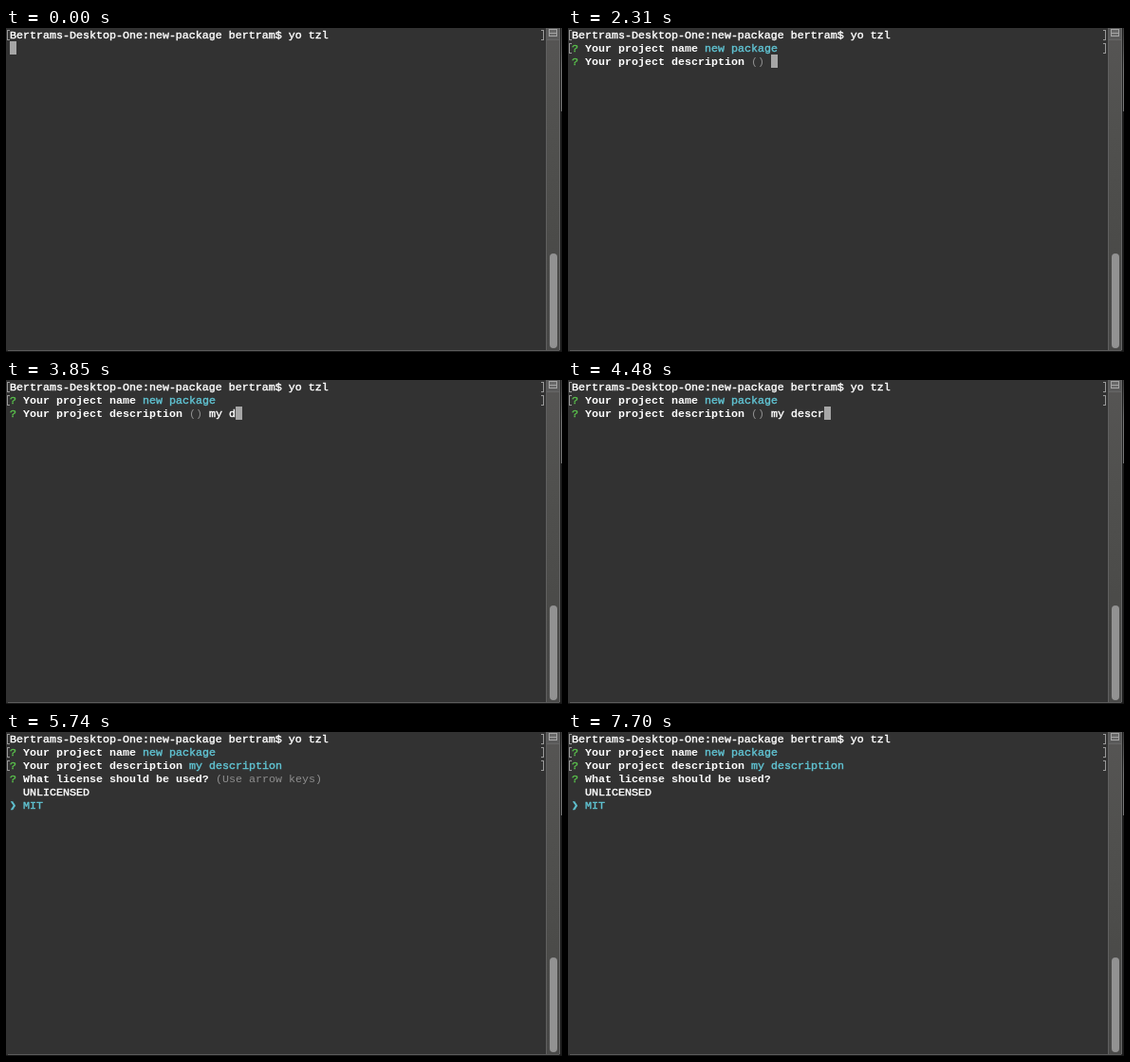
An HTML page with a canvas that plays this animation: 586 by 342 pixels, repeating every 8 s.

```html
<!DOCTYPE html>
<html lang="en">
<head>
<meta charset="utf-8">
<title>Terminal</title>
<style>
html, body { margin: 0; width: 100%; height: 100%; overflow: hidden; background: #323232; }
canvas { display: block; }
</style>
</head>
<body>
<canvas id="stage" width="586" height="342"></canvas>
<script>
const ctx = document.getElementById('stage').getContext('2d');
const LOOP = 8000, COL = 7, ROW = 14, LEFT = 4;
const WHITE = '#fff', DIM = '#8e8e8e', GREEN = '#5ac24c', CYAN = '#60c3d2', CURSOR = '#a6a6a6';
const DESCRIPTION = 'my description';
const KEY_TIMES = [3360, 3500, 3570, 3850, 3920, 4130, 4340, 4480, 4690, 4900, 5040, 5110, 5250, 5460];

function rect(color, x, y, w, h) {
  ctx.fillStyle = color;
  ctx.fillRect(x, y, w, h);
}

function fade(height, ...stops) {
  const gradient = ctx.createLinearGradient(0, 0, 0, height);
  stops.forEach((color, i) => gradient.addColorStop(i / (stops.length - 1), color));
  return gradient;
}

// A thin outline thickens the regular face to a medium weight
function text(row, col, str, color, { bold = false, outline = 0.4 } = {}) {
  const x = LEFT + col * COL, y = 11 + row * ROW;
  ctx.font = `${bold ? 700 : 400} 11.667px "Liberation Mono", "DejaVu Sans Mono", monospace`;
  ctx.fillStyle = ctx.strokeStyle = color;
  ctx.fillText(str, x, y);
  if (bold || !outline) return;
  ctx.lineWidth = outline;
  ctx.strokeText(str, x, y);
}

function cursor(row, col) {
  rect(CURSOR, LEFT + col * COL, row * ROW, COL, ROW);
}

// Marks around a line that has been entered
function brackets(row) {
  const y = row * ROW + 2;
  for (const [bar, tick] of [[1, 1], [566, 564]]) {
    rect('#9a9a9a', bar, y, 1, 11);
    rect('#9a9a9a', tick, y, 3, 1);
    rect('#9a9a9a', tick, y + 10, 3, 1);
  }
}

function question(row, str) {
  text(row, 0, '?', GREEN);
  text(row, 2, str, WHITE, { bold: true });
}

function option(row, str, selected) {
  if (selected) text(row, 0, '❯', CYAN);
  text(row, 2, str, selected ? CYAN : WHITE);
}

function drawWindow() {
  rect('#323232', 0, 0, 586, 342);
  rect(fade(340, '#565554', '#50504e', '#4b4b49', '#494948'), 569, 0, 15, 340);
  rect('#606060', 569, 0, 1, 340);
  rect('#666', 583, 0, 1, 340);
  rect('#1c1c1c', 584, 0, 2, 342);
  rect(fade(88, '#3a3a3a', '#777', '#777'), 585, 0, 1, 88);
  rect('#5c5c5c', 2, 340, 581, 1);
  rect('#161616', 0, 341, 586, 1);

  rect('#5a5a5a', 570, 0, 13, 12);
  rect('#666', 570, 12, 13, 1);
  rect('#a4a4a4', 572, 1, 9, 8);
  rect('#686868', 573, 2, 7, 3);
  rect('#686868', 573, 6, 7, 2);

  ctx.fillStyle = '#929292';
  ctx.beginPath();
  ctx.roundRect(573, 238, 8, 100, 4);
  ctx.fill();
}

function drawName(t) {
  if (t < 1120) return cursor(1, 0);
  question(1, 'Your project name');
  if (t >= 2240) brackets(1);
  if (t >= 2310) return text(1, 20, 'new package', CYAN);
  text(1, 20, '(new package)', DIM, { outline: 0 });
  if (t < 2240) cursor(1, 34);
  else cursor(2, 0);
}

function drawDescription(t) {
  if (t < 2310) return;
  question(2, 'Your project description');
  if (t >= 5740) {
    brackets(2);
    text(2, 27, DESCRIPTION, CYAN);
    return;
  }
  const typed = KEY_TIMES.filter(k => k <= t).length;
  text(2, 27, '()', DIM, { outline: 0 });
  text(2, 30, DESCRIPTION.slice(0, typed), WHITE);
  cursor(2, 30 + typed);
}

function drawLicense(t) {
  if (t < 5740) return;
  question(3, 'What license should be used?');
  if (t < 7350) text(3, 31, '(Use arrow keys)', DIM, { outline: 0 });
  const first = t >= 7350 && t < 7700;
  option(4, 'UNLICENSED', first);
  option(5, 'MIT', !first);
}

function draw(now) {
  const t = now % LOOP;
  drawWindow();
  brackets(0);
  text(0, 0, 'Bertrams-Desktop-One:new-package bertram$ yo tzl', WHITE);
  drawName(t);
  drawDescription(t);
  drawLicense(t);
}

let start;
function tick(now) {
  start ??= now;
  draw(now - start);
  requestAnimationFrame(tick);
}
draw(0);
requestAnimationFrame(tick);
</script>
</body>
</html>
```
